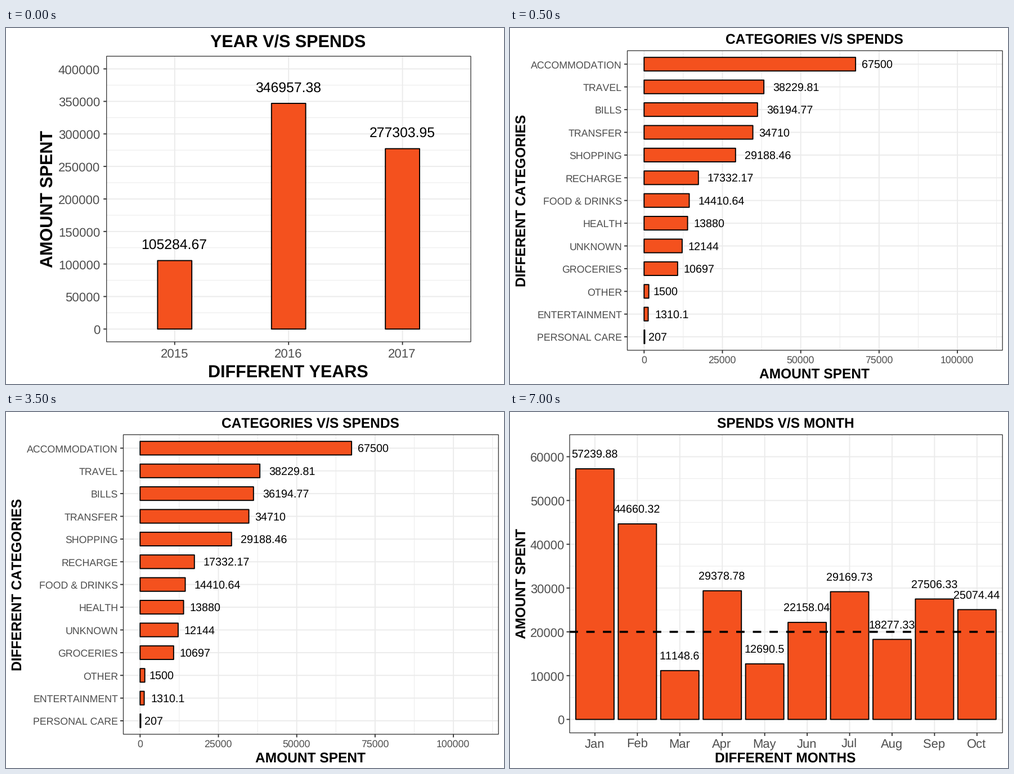
A matplotlib script for the animation above (8000 ms loop, 885 px wide and 633 px high).

```python
import matplotlib.pyplot as plt
from matplotlib.animation import FuncAnimation
from matplotlib.patches import Rectangle

W, H, DPI = 885, 633, 64
PT = 72 / DPI  # points per pixel
ORANGE, AXIS, TICK_TEXT, GRID = "#F4511E", "#333333", "#4D4D4D", "#EBEBEB"

plt.rcParams.update({
    "font.family": "Liberation Sans",
    "text.hinting": "none",
    "text.kerning_factor": 6,
    "path.snap": False,
})

fig = plt.figure(figsize=(W / DPI, H / DPI), dpi=DPI, facecolor="white")
ax = fig.add_axes([0, 0, 1, 1])


def reset():
    ax.clear()
    ax.set_xlim(0, W)
    ax.set_ylim(H, 0)
    ax.axis("off")


def line(x0, y0, x1, y1, color, width, z, **kw):
    ax.plot([x0, x1], [y0, y1], color=color, lw=width * PT, zorder=z,
            solid_capstyle="butt", dash_capstyle="butt", **kw)


def text(x, y, s, size, color="black", ha="center", bold=False, up=False):
    """Write s with the middle of its capitals at (x, y)."""
    drop = 0.358 * size
    bearing = 0.03 * size  # blank left of the first glyph
    if up:
        x += drop
    else:
        x, y = x - bearing, y + drop
    ax.text(x, y, s, fontsize=size * PT, color=color, ha=ha, va="baseline",
            rotation=90 * up, rotation_mode="anchor",
            weight="bold" if bold else "normal", zorder=6)


def bar(x, y, w, h):
    ax.add_patch(Rectangle((x, y), w, h, facecolor=ORANGE, edgecolor="black",
                           lw=1.9 * PT, joinstyle="round", zorder=3))


def panel(box, xs, ys, minor_x=(), minor_y=()):
    """Frame, grid lines and tick marks of one plot."""
    left, top, right, bottom = box
    for x in minor_x:
        line(x, top, x, bottom, GRID, 1, 1)
    for y in minor_y:
        line(left, y, right, y, GRID, 1, 1)
    for y in ys:
        line(left, y, right, y, GRID, 1.9, 2)
        line(left - 5.5, y, left, y, AXIS, 1.9, 4)
    for x in xs:
        line(x, top, x, bottom, GRID, 1.9, 2)
        line(x, bottom, x, bottom + 5.5, AXIS, 1.9, 4)
    ax.add_patch(Rectangle((left, top), right - left, bottom - top, fill=False,
                           edgecolor=AXIS, lw=1.3 * PT, zorder=5))


def titles(size, x, main, main_y, below, below_y, side, side_x, side_y):
    text(x, main_y, main, size, bold=True)
    text(x, below_y, below, size, bold=True)
    text(side_x, side_y, side, size, bold=True, up=True)


def tick_labels(size, xs, x_names, x_y, ys, y_names, y_x):
    for x, s in zip(xs, x_names):
        text(x, x_y, s, size, TICK_TEXT)
    for y, s in zip(ys, y_names):
        text(y_x, y + 0.7, s, size, TICK_TEXT, ha="right")


def years():
    spends = {2015: 105284.67, 2016: 346957.38, 2017: 277303.95}
    base, scale = 535.3, 57.83 / 50000
    amounts = range(0, 400001, 50000)
    xs = [299.8 + 202.4 * i for i in range(3)]
    ys = [base - v * scale for v in amounts]
    panel((178.7, 50.2, 826, 558), xs, ys,
          minor_y=[y - 25000 * scale for y in ys[:-1]])
    for x, v in zip(xs, spends.values()):
        h = v * scale
        bar(x - 30.4, base - h, 60.8, h)
        text(x, base - h - 29.2, str(v), 24.7)
    tick_labels(22.2, xs, spends, 578.3, ys, amounts, 167.8)
    titles(30.5, 502.3, "YEAR V/S SPENDS", 23.7, "DIFFERENT YEARS", 609.8,
           "AMOUNT SPENT", 72, 303.6)


def categories():
    spends = {
        "ACCOMMODATION": 67500, "TRAVEL": 38229.81, "BILLS": 36194.77,
        "TRANSFER": 34710, "SHOPPING": 29188.46, "RECHARGE": 17332.17,
        "FOOD & DRINKS": 14410.64, "HEALTH": 13880, "UNKNOWN": 12144,
        "GROCERIES": 10697, "OTHER": 1500, "ENTERTAINMENT": 1310.1,
        "PERSONAL CARE": 207,
    }
    base, scale, size = 238.3, 139.2 / 25000, 19.8
    amounts = range(0, 100001, 25000)
    xs = [base + v * scale for v in amounts]
    ys = [64.3 + 40.4 * i for i in range(len(spends))]
    panel((208.5, 40.4, 875.2, 573), xs, ys,
          minor_x=[x + 12500 * scale for x in xs])
    for y, v in zip(ys, spends.values()):
        w, s = v * scale, str(v)
        bar(base, y - 12.1, w, 24.2)
        # labels start a fifth of their own width past the bar
        width = size * (0.556 * len(s) - 0.278 * s.count("."))
        text(base + w + 0.7 * width, y + 0.8, s, size)
    tick_labels(17.8, xs, amounts, 589.8, ys, spends, 199.6)
    titles(24.5, 541.9, "CATEGORIES V/S SPENDS", 18.9, "AMOUNT SPENT", 614.4,
           "DIFFERENT CATEGORIES", 19.3, 306.6)


def months():
    spends = {
        "Jan": 57239.88, "Feb": 44660.32, "Mar": 11148.6, "Apr": 29378.78,
        "May": 12690.5, "Jun": 22158.04, "Jul": 29169.73, "Aug": 18277.33,
        "Sep": 27506.33, "Oct": 25074.44,
    }
    base, scale = 546.6, 77.85 / 10000
    amounts = range(0, 60001, 10000)
    xs = [150.9 + 75.44 * i for i in range(len(spends))]
    ys = [base - v * scale for v in amounts]
    panel((106, 40.4, 875.2, 570.5), xs, ys,
          minor_y=[y - 5000 * scale for y in ys[:-1]])
    for x, v in zip(xs, spends.values()):
        h = v * scale
        bar(x - 34, base - h, 68, h)
        text(x, base - h - 26, str(v), 19.8)
    limit = base - 20000 * scale
    line(106, limit, 875, limit, "black", 3.7, 4, ls=(0, (4, 4)))
    tick_labels(22, xs, spends, 588.6, ys, amounts, 97.5)
    titles(24.5, 490.3, "SPENDS V/S MONTH", 18.9, "DIFFERENT MONTHS", 614.4,
           "AMOUNT SPENT", 19.3, 305)


STEP, LOOP = 500, 8000


def draw(frame):
    t = frame * STEP
    reset()
    if t < 500:
        years()
    elif t < 5500:
        categories()
    else:
        months()
    return []


anim = FuncAnimation(fig, draw, frames=LOOP // STEP, interval=STEP,
                     init_func=lambda: draw(0), repeat=True, repeat_delay=0)
plt.show()
```
